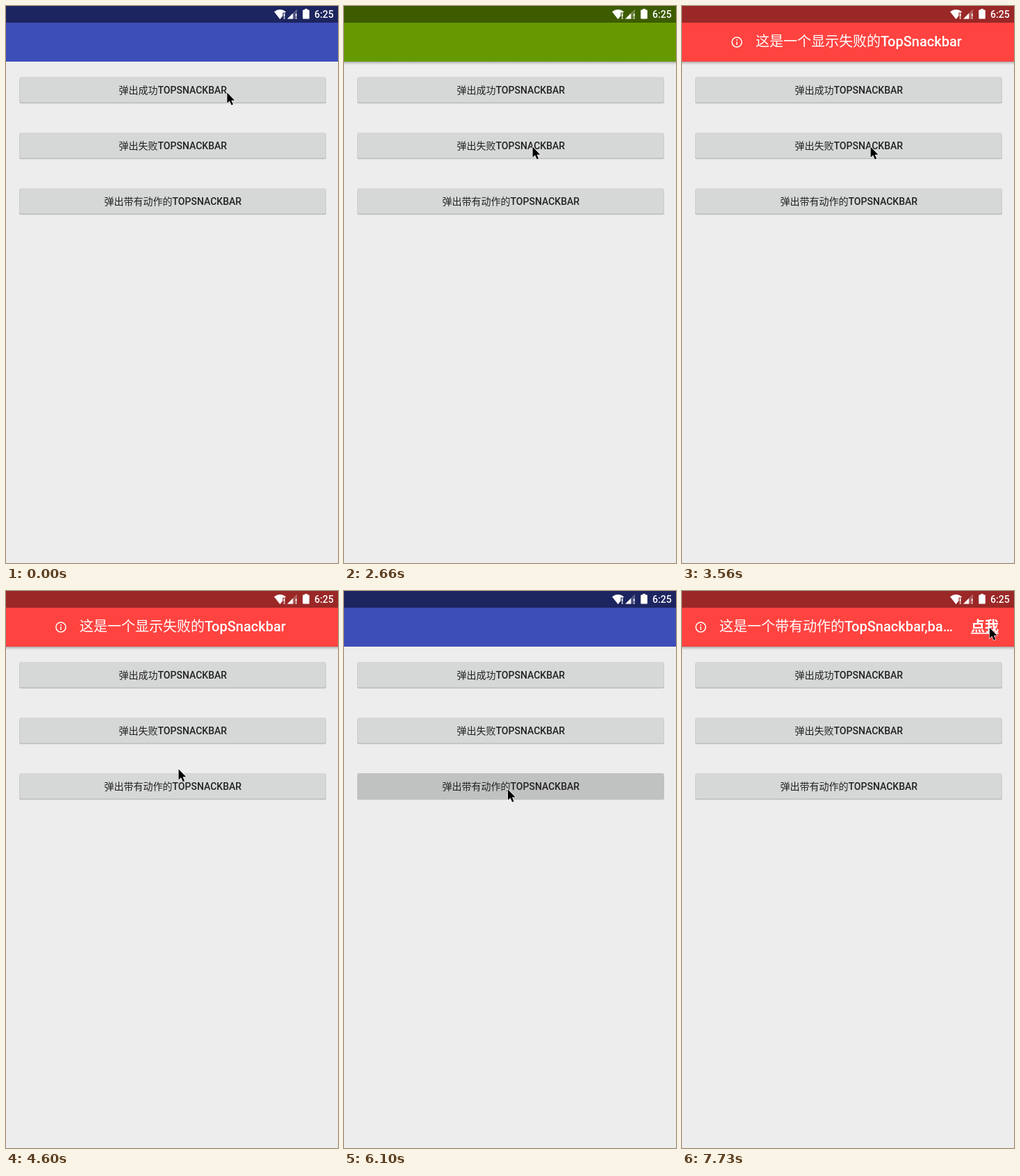
Recreate the animation shown at these times as an HTML page. Size 478 px wide and 801 px high, loop 8000 ms.

```html
<!DOCTYPE html>
<html lang="zh-CN">
<head>
<meta charset="utf-8">
<title>TopSnackbar</title>
<style>
  html, body { margin: 0; width: 100%; height: 100%; overflow: hidden; background: #ededed; }
  svg { display: block; width: 100%; height: 100%; }
  text { font-family: Roboto, "Noto Sans CJK SC", "Noto Sans CJK", sans-serif; font-weight: 500; }
  .cjk { font-weight: 400; }
  .label { font-size: 14px; fill: #222; text-anchor: middle; }
  .title { font-size: 20px; fill: #fff; }
  .action { font-size: 20px; font-weight: 700; fill: #fff; }
</style>
</head>
<body>
<svg viewBox="0 0 478 801">
  <defs>
    <linearGradient id="shade" x2="0" y2="1">
      <stop offset="0" stop-color="#000" stop-opacity=".3"/>
      <stop offset=".4" stop-color="#000" stop-opacity=".13"/>
      <stop offset="1" stop-color="#000" stop-opacity="0"/>
    </linearGradient>
    <path id="check" fill="#fff" fill-rule="evenodd" d="M12 2a10 10 0 1 0 0 20a10 10 0 1 0 0-20zM10 17l-5-5 1.41-1.41L10 14.17l7.59-7.59L19 8z"/>
    <g id="info" fill="#fff">
      <circle cx="12" cy="12" r="9" fill="none" stroke="#fff" stroke-width="2"/>
      <path d="M11 7h2v2h-2zM11 11h2v6h-2z"/>
    </g>
  </defs>

  <rect width="478" height="801" fill="#ededed"/>
  <rect width="478" height="80" fill="#3d4eb8"/>
  <rect width="478" height="24" fill="#303d9f"/>
  <g id="buttons"></g>

  <g id="bar">
    <rect y="80" width="478" height="5" fill="url(#shade)"/>
    <rect id="fill" width="478" height="80"/>
    <g id="content"></g>
  </g>

  <rect width="478" height="24" fill="#000" opacity=".4"/>
  <g fill="#fff">
    <path d="M386 8.2Q394.5 1.6 403 8.2L402 9.4H398.4V14.2L394.5 19z"/>
    <path d="M399.7 10.4h1.8v5h-1.8zM399.7 16.6h1.8v1.8h-1.8z"/>
    <path d="M405 18.4L419 4.4V9.4H415.6V18.4z" opacity=".3"/>
    <path d="M405 18.4L413 10.4V18.4z"/>
    <path d="M416.7 10.4h1.8v5h-1.8zM416.7 16.6h1.8v1.8h-1.8z"/>
    <path d="M428.2 5.4h2V4h3.6v1.4h2q1 0 1 1v11q0 1-1 1h-7.6q-1 0-1-1v-11q0-1 1-1z"/>
    <text x="444" y="17" font-size="14">6:25</text>
  </g>

  <path id="cursor" d="M0 0V15.2L3.5 12L6.2 18L8.6 17L6 11.1H10.8z" fill="#000" stroke="#fff" stroke-width="1.2" paint-order="stroke"/>
</svg>
<script>
const LOOP = 8000;
const GREEN = '#669900', RED = '#ff4340';
const $ = id => document.getElementById(id);
const mixed = (cjk, latin) => `<tspan class="cjk">${cjk}</tspan><tspan>${latin}</tspan>`;

const button = (label, i) => {
  const y = 102 + 80 * i;
  return `<rect x="19" y="${y + 1}" width="442" height="37.2" rx="2.5" fill="#bfc0c0"/>
    <rect x="19.5" y="${y}" width="441" height="36.6" rx="2" fill="#d6d8d7"/>
    <rect class="press" x="19.5" y="${y}" width="441" height="36.6" rx="2" opacity="0"/>
    <text class="label" x="240.3" y="${y + 24}">${mixed(label, 'TOPSNACKBAR')}</text>`;
};
$('buttons').innerHTML = ['弹出成功', '弹出失败', '弹出带有动作的'].map(button).join('');
const presses = [...document.querySelectorAll('.press')];

const icon = (id, x) => `<use href="#${id}" transform="translate(${x} 52) scale(.78) translate(-12 -12)"/>`;
const title = (x, cjk, latin) => `<text class="title" x="${x}" y="58">${mixed(cjk, latin)}</text>`;
const contents = [
  icon('check', 79) + title(106, '这是一个显示成功的', 'TopSnackbar'),
  icon('info', 79) + title(106, '这是一个显示失败的', 'TopSnackbar'),
  icon('info', 27) + title(54, '这是一个带有动作的', 'TopSnackbar,ba…') +
    '<text class="action" x="416" y="58">点我</text><rect x="416" y="60" width="40" height="1.6" fill="#fff"/>'
];
$('content').innerHTML = contents.map(c => `<g>${c}</g>`).join('');
const groups = [...$('content').children];

// press: button darkens, slide: bar part way in, full: settled, fade: content leaving, end: bar gone
const bars = [
  { color: GREEN, press: 290, slide: 430, full: 580, fade: 2660, end: 2810, rest: 0 },
  { color: RED, press: 3260, slide: 3410, full: 3560, fade: 5650, end: 5800, rest: .07 },
  { color: RED, press: 6100, slide: 6250, full: 6400, fade: LOOP, end: LOOP, rest: 0 }
];

const moves = [
  { from: 140, to: 140, steps: 1, x: 319.4, y: 123.6 },
  { from: 1630, to: 2210, steps: 5, x: 271.6, y: 202.6 },
  { from: 4300, to: 4900, steps: 5, x: 236, y: 285.4 },
  { from: 6690, to: 7730, steps: 8, x: 442.8, y: 52.8 }
];

const smooth = p => p * p * (3 - 2 * p);

function pointer(t) {
  let x = 318.4, y = 124.6;
  for (const m of moves) {
    if (t < m.from) break;
    const gap = (m.to - m.from) / Math.max(1, m.steps - 1) || 1;
    const done = Math.min(m.steps, Math.floor((t - m.from + 5) / gap) + 1);
    const p = smooth(done / m.steps);
    x += (m.x - x) * p;
    y += (m.y - y) * p;
  }
  return [x, y];
}

function draw(t) {
  $('cursor').setAttribute('transform', `translate(${pointer(t)})`);
  let shown = false;
  bars.forEach((b, i) => {
    const pressed = t >= b.press && t < b.full;
    presses[i].setAttribute('opacity', !pressed ? 0 : t < b.slide ? .1 : .05);
    const on = t >= b.slide && t < b.end;
    groups[i].style.display = on ? '' : 'none';
    if (!on) return;
    shown = true;
    const sliding = t < b.full;
    $('fill').setAttribute('fill', b.color);
    $('bar').setAttribute('transform', `translate(0 ${sliding ? -16 : 0})`);
    groups[i].setAttribute('opacity', sliding ? .45 : t >= b.fade ? b.rest : 1);
  });
  $('bar').style.display = shown ? '' : 'none';
}

const start = performance.now();
function tick() {
  draw((performance.now() - start) % LOOP);
  requestAnimationFrame(tick);
}
tick();
</script>
</body>
</html>
```
